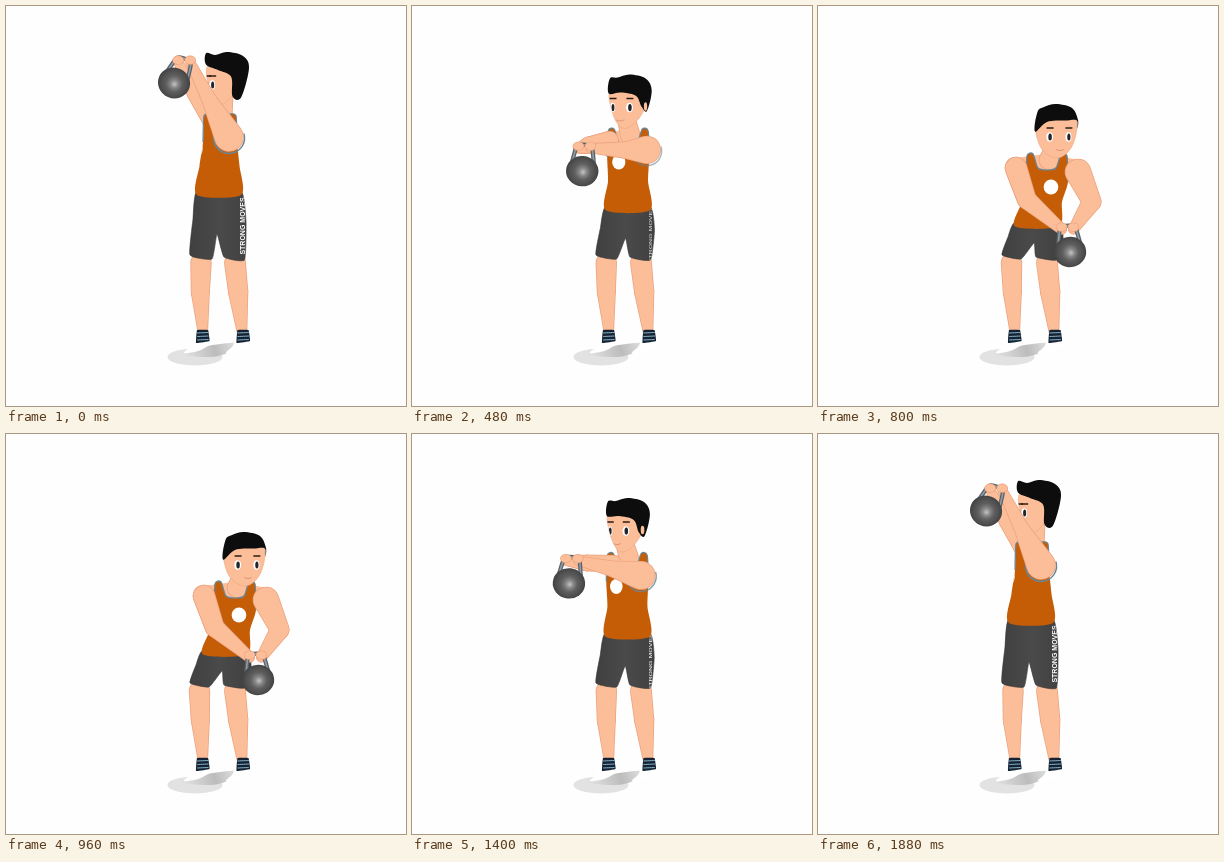
These frames come from a looping animation (400 px wide and 400 px high, 1920 ms). An HTML page with a canvas:

```html
<!DOCTYPE html>
<html lang="en">
<head>
<meta charset="utf-8">
<title>Kettlebell swing</title>
<style>
  html, body { margin: 0; width: 100%; height: 100%; overflow: hidden; background: #fefefe; }
  canvas { display: block; width: 400px; height: 400px; }
</style>
</head>
<body>
<canvas id="stage" width="400" height="400"></canvas>
<script>
const ctx = document.getElementById('stage').getContext('2d');
const LOOP = 1920, STEP = 40;
const SKIN = '#fcbe98', EDGE = '#eba481', SHIRT = '#c55c06', TRIM = '#66879a';

// Time to swing position: 0 overhead, 1 arms out, 2 at the belt, 3 beside the knee
const swing = [[0, 0], [320, 1], [640, 2], [800, 3], [960, 3], [1120, 2.3], [1400, 1.3], [1880, 0], [LOOP, 0]];

// Swing position to: head turn, head x y, chest x y, bell x y, bell tilt
const poses = [
  [0, -1.3, 221, 73, 214, 124, 168, 77, .42],
  [1, -.75, 214, 84, 214, 130, 141, 124, .18],
  [2, -.2, 225, 110, 220, 151, 215, 213, 0],
  [3, .2, 238, 125, 229, 164, 252, 246, -.1]
];

// Smooth curve through keys of the form [x, ...values], level at both ends
function spline(keys, x) {
  let i = 0;
  while (i < keys.length - 2 && x >= keys[i + 1][0]) i++;
  const a = keys[i], b = keys[i + 1], d = b[0] - a[0], s = (x - a[0]) / d;
  const slope = (k, n) => keys[k - 1] && keys[k + 1]
    ? (keys[k + 1][n] - keys[k - 1][n]) / (keys[k + 1][0] - keys[k - 1][0]) * d : 0;
  const e = s * s * (3 - 2 * s);
  return a.slice(1).map((v, n) => v + (b[n + 1] - v) * e
    + slope(i, n + 1) * s * (1 - s) ** 2 - slope(i + 1, n + 1) * s * s * (1 - s));
}

const clamp = v => Math.max(0, Math.min(1, v));
const smooth = v => { v = clamp(v); return v * v * (3 - 2 * v); };
const move = ([x, y], pts) => pts.map(([dx, dy]) => [x + dx, y + dy]);

function curve(pts, bend = 1 / 6, closed = true) {
  const n = pts.length, path = new Path2D();
  const at = i => pts[closed ? (i + n) % n : Math.max(0, Math.min(n - 1, i))];
  path.moveTo(...pts[0]);
  for (let i = 0; i < (closed ? n : n - 1); i++) {
    const [a, b, c, d] = [at(i - 1), at(i), at(i + 1), at(i + 2)];
    path.bezierCurveTo(b[0] + (c[0] - a[0]) * bend, b[1] + (c[1] - a[1]) * bend,
      c[0] - (d[0] - b[0]) * bend, c[1] - (d[1] - b[1]) * bend, c[0], c[1]);
  }
  if (closed) path.closePath();
  return path;
}

function fill(path, color) { ctx.fillStyle = color; ctx.fill(path); }

function stroke(path, color, width) {
  ctx.strokeStyle = color;
  ctx.lineWidth = width;
  ctx.stroke(path);
}

function oval(x, y, rx, ry, color) {
  const path = new Path2D();
  path.ellipse(x, y, Math.max(0, rx), ry, 0, 0, 7);
  fill(path, color);
}

function line(x1, y1, x2, y2, color, width) {
  stroke(curve([[x1, y1], [x2, y2]], 0, false), color, width);
}

function within(path, paint) {
  ctx.save();
  ctx.clip(path);
  paint();
  ctx.restore();
}

function gradient(g, ...colors) {
  colors.forEach((c, i) => g.addColorStop(i / (colors.length - 1), c));
  return g;
}

function taper([ax, ay, ra], [bx, by, rb], grow, color) {
  const dx = bx - ax, dy = by - ay, dir = Math.atan2(dy, dx);
  const off = Math.acos(Math.max(-1, Math.min(1, (ra - rb) / Math.hypot(dx, dy))));
  const path = new Path2D();
  path.arc(ax, ay, ra + grow, dir + off, dir - off + 2 * Math.PI);
  path.arc(bx, by, rb + grow, dir - off, dir + off);
  fill(path, color);
}

function limb(...joints) {
  for (const [grow, color] of [[.3, EDGE], [-.5, SKIN]])
    for (let i = 1; i < joints.length; i++) taper(joints[i - 1], joints[i], grow, color);
}

function drawGround() {
  oval(189, 351, 27.5, 8.5, '#e2e2e2');
  fill(curve([[176, 348], [202, 340], [232, 337], [226, 345], [205, 351]]),
    gradient(ctx.createLinearGradient(180, 352, 238, 336), '#e0e0e0', '#bcbcbc', '#ececec'));
  for (const x of [189, 231])
    fill(curve([[x, 334], [x + 13, 335], [x + 14, 339], [x + 3, 345], [x - 11, 347], [x - 5, 341]]), '#fff');
}

function drawLegs(p) {
  limb([195 - p * .5, 257, 10.4], [194.3, 286, 9.2], [197, 329, 4.6]);
  limb([229, 257, 10.6], [232.2, 286, 9.8], [236.3, 329, 4.6]);
  for (const x of [190, 230.5]) {
    fill(curve([[x + 1, 324], [x + 12, 324], [x + 13.5, 335], [x, 337]], .03), '#142233');
    for (let y = 327; y < 336; y += 3.5) line(x + 1, y, x + 12.5, y - .5, '#8db9cc', 1);
  }
}

function drawShorts([x, y], p) {
  const hip = [240 + p * 1.7, 215 + p * 6];
  const path = curve([[x - 22, y - 4], [x + 22, y - 4], hip, [238.5, 254], [218, 251],
    [211 + p * 1.7, 228 + p * 3], [206 - p, 253], [184, 249], [187 + p, 213 + p * 6]], .07);
  fill(path, gradient(ctx.createLinearGradient(184, 0, 244, 0), '#404040', '#4a4a4a', '#404040'));
  stroke(path, '#363636', .6);
  within(path, () => {
    ctx.translate(hip[0] - 3, hip[1] + 5);
    ctx.rotate(-Math.PI / 2);
    ctx.scale(1, Math.max(.1, 1 - p * .42));
    ctx.globalAlpha = clamp(2.1 - p);
    ctx.font = 'bold 7px Arial, "Liberation Sans", sans-serif';
    ctx.textAlign = 'center';
    ctx.textBaseline = 'middle';
    ctx.fillStyle = '#fff';
    ctx.fillText('STRONG MOVES', 0, 0);
  });
}

function drawShirt(collar, [wx, wy], turn, p) {
  const out = clamp(p), w = 16 + 4 * out, dip = 1 + 13 * out, [cx, cy] = collar;
  const side = k => [cx + k * (w + 1), cy + 26];
  const waist = k => [(cx + wx) / 2 + k * 20, cy + 26 + (wy - cy - 26) * .45];
  const top = move(collar, [[-w, 0], [6 - w, -2], [-9, dip - 2], [0, dip], [9, dip - 2], [w - 6, -2], [w, 0]]);
  const path = curve([...top, side(1), waist(1), [wx + 22, wy], [wx - 22, wy], waist(-1), side(-1)], .13);
  fill(path, SHIRT);
  stroke(curve([side(-1), ...top, side(1)], .13, false), TRIM, 1.2);
  within(path, () => oval(cx + 20 * Math.sin(turn), cy + 31, 7.5 * Math.cos(turn), 7.5, '#fff'));
}

function drawHead(head, turn) {
  const [x, y] = head, yaw = Math.sin(turn), back = -yaw;
  const face = curve(move(head, [[-20, -12], [0, -20], [20, -12], [15 + 8 * yaw, 14], [9 * yaw, 27], [-15.5, 16]]));
  fill(face, SKIN);
  stroke(face, EDGE, .6);
  within(face, () => {
    for (const offset of [-.5, .5]) {
      const ex = x + 20 * Math.sin(turn + offset), w = Math.cos(turn + offset), ey = y + 6;
      oval(ex - .4, ey, 1.5 + 2 * w, 4.8, '#fff');
      oval(ex, ey, 1 + .8 * w, 3.6, '#20262c');
      line(ex - 3.5, ey - 9, ex + 3.5, ey - 9, '#2a1c16', 1.6);
    }
    const mx = x + 20 * yaw, my = y + 19;
    stroke(curve([[mx - 4, my - .5], [mx, my + .5], [mx + 4, my - .5]], 1 / 6, false), '#dc9273', 1);
  });

  // Hair grows down the back of the head as it turns away
  fill(curve(move(head, [
    [-21, -2 - 13 * back], [-19 - 2 * back, -20 - 6 * back], [-12, -24], [0, -27], [16, -23], [22, -11],
    [20 - 6 * back, 1 + 18 * back], [18 - 13 * back, 24 * back - 6], [8 - 4 * back, 7 * back - 9], [-9, -9]
  ])), '#0d0d0d');
  oval(x + 20 * Math.sin(turn + 1.4), y + 5, 2.7 * Math.cos(turn + 1.4), 4.2, SKIN);
}

function drawBell(x, y, tilt) {
  ctx.save();
  ctx.translate(x, y);
  ctx.rotate(tilt);
  const handle = curve([[-11, -8], [-8, -23], [-4, -26], [4, -26], [8, -23], [11, -8]], .13, false);
  stroke(handle, '#59626a', 4.2);
  stroke(handle, '#929ba2', 1.6);
  oval(0, 0, 16.2, 15.2, gradient(ctx.createRadialGradient(1, 1, 0, 0, 0, 16.5),
    '#c4c4c4', '#848484', '#5e5e5e', '#505050', '#404040'));
  ctx.restore();
}

function draw(t) {
  const [p] = spline(swing, t);
  const [turn, hx, hy, chestX, chestY, bellX, bellY, tilt] = spline(poses, p);
  const front = smooth(p - 1);
  const waist = [213 + 2 * p, 189 + 10.5 * p], collar = [chestX, chestY - 14];
  const gripX = bellX + 25 * Math.sin(tilt), gripY = bellY - 25 * Math.cos(tilt);

  // Arms reach from the turning shoulders to the grip; elbows flare out at the front
  const arm = (k, bend, r) => {
    const sx = chestX + k * (9 + 22 * front), sy = chestY + k * (7 - 5 * front);
    const gx = gripX + k * 6;
    return [[sx, sy, r], [(sx + gx) / 2 + k * bend * front, (sy + gripY) / 2 + 2, 7.5 + 2 * front],
      [gx, gripY + 2, 4.6 + front * .6]];
  };
  const far = arm(-1, 12, 7.5 + 3.5 * front), near = arm(1, 16, 14.5 - 1.5 * front);

  ctx.fillStyle = '#fefefe';
  ctx.fillRect(0, 0, 400, 400);
  drawGround();
  drawLegs(p);
  limb(...far);
  for (const [x, y, r] of [far[0], near[0]]) taper([collar[0], collar[1] + 9, 11], [x, y, r - 1], 0, SKIN);
  limb([hx - 3, hy + 19, 9], [collar[0] + 2, collar[1] + 4, 10]);
  drawShorts(waist, p);
  drawShirt(collar, waist, turn, p);
  drawHead([hx, hy], turn);
  if (front > 0) limb(...far);

  ctx.globalAlpha = 1 - front;
  const armhole = new Path2D();
  armhole.arc(near[0][0], near[0][1] + 1, near[0][2] + 1, -.3, Math.PI + .3);
  stroke(armhole, TRIM, 1.5);
  ctx.globalAlpha = 1;
  limb(...near);

  drawBell(bellX, bellY, tilt);
  for (const k of [-1, 1]) {
    oval(gripX + k * 6, gripY, 5.8, 4.6, EDGE);
    oval(gripX + k * 6, gripY, 5.1, 3.9, SKIN);
  }
}

const start = performance.now();
function tick() {
  const t = (performance.now() - start) % LOOP;
  draw(Math.floor(t / STEP) * STEP);
  requestAnimationFrame(tick);
}
tick();
</script>
</body>
</html>
```
